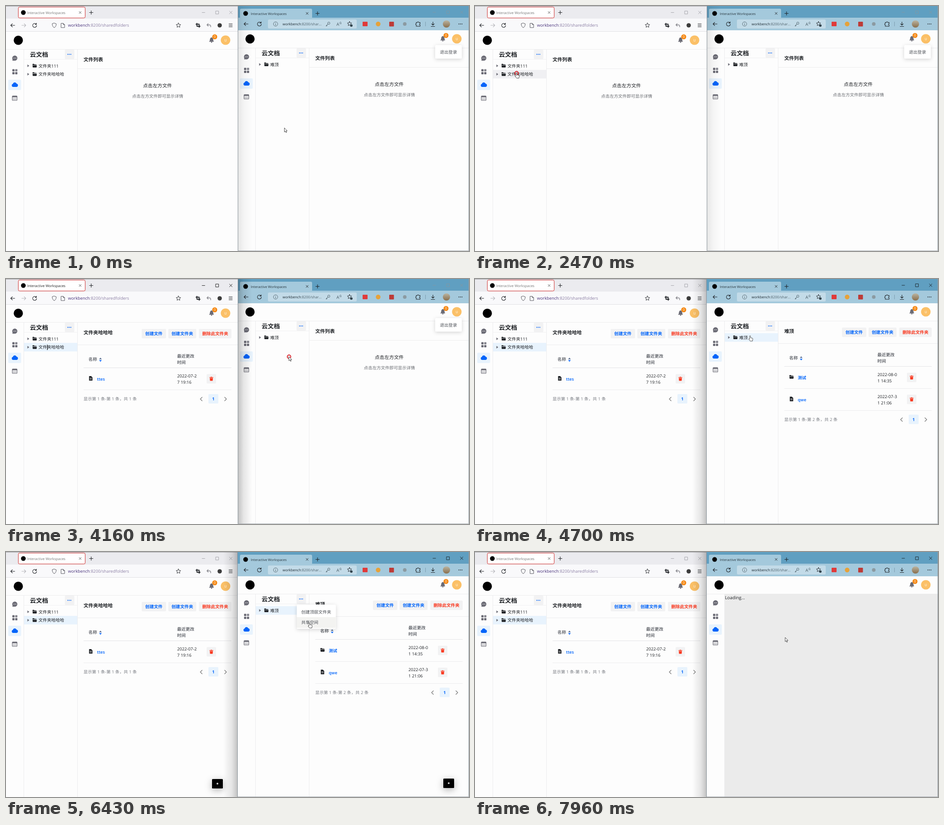
Animation, 1027 px wide and 545 px high, one loop 7990 ms. Source, as an HTML page:

```html
<!DOCTYPE html>
<html lang="zh-CN">
<head>
<meta charset="utf-8">
<title>Cloud files</title>
<style>
html, body { margin: 0; width: 100%; height: 100%; overflow: hidden; background: #fdfdfd; }
svg { display: block; width: 1027px; height: 545px; }
text { font-family: 'Open Sans', 'Noto Sans CJK SC', 'Noto Sans CJK', sans-serif; text-rendering: geometricPrecision; white-space: pre; }
</style>
</head>
<body>
<svg id="stage" viewBox="0 0 1027 545"></svg>
<script>
const LOOP = 7990;
const INK = '#1c1f23', GREY = '#6b6b75', BLUE = '#0064fa', RED = '#f93920';
const LINE = '#ececee', SOFT = '#f2f2f3', PALE = '#e8f3fd', BOLD = 'font-weight="700"', MID = 'text-anchor="middle"';

// SVG builders
const rect = (x, y, w, h, fill, r = 0, more = '') =>
  `<rect x="${x}" y="${y}" width="${w}" height="${h}" rx="${r}" fill="${fill}" ${more}/>`;
const disc = (x, y, r, fill, more = '') => `<circle cx="${x}" cy="${y}" r="${r}" fill="${fill}" ${more}/>`;
const shape = (d, fill) => `<path d="${d}" fill="${fill}"/>`;
const stroke = (d, color = INK, w = 1) =>
  `<path d="${d}" fill="none" stroke="${color}" stroke-width="${w}" stroke-linecap="round" stroke-linejoin="round"/>`;
const text = (x, y, s, size = 9.5, fill = INK, more = '') =>
  `<text x="${x}" y="${y}" font-size="${size}" fill="${fill}" ${more}>${s}</text>`;
const group = (id, body, x = 0, y = 0, more = '') =>
  `<g ${id ? `id="${id}"` : ''} transform="translate(${x} ${y})" ${more}>${body}</g>`;

// Small icons, drawn around their centre
const back = (x, y, c = INK) => stroke(`M${x + 4.5} ${y}h-9m3.7 -3.7l-3.7 3.7l3.7 3.7`, c, 1.1);
const reload = (x, y) => stroke(`M${x + 3.6} ${y - 2.4}a4.4 4.4 0 1 0 .8 2.6M${x + 4} ${y - 5}v2.9h-2.9`, INK, 1.1);
const cross = (x, y, r, c, w = 1) => stroke(`M${x - r} ${y - r}l${2 * r} ${2 * r}m0 ${-2 * r}l${-2 * r} ${2 * r}`, c, w);
const plus = (x, y) => stroke(`M${x - 4} ${y}h8m-4 -4v8`, INK, 1.1);
const dots = (x, y, gap, r, c) => [-gap, 0, gap].map(d => disc(x + d, y, r, c)).join('');
const folder = (x, y) => shape(`M${x - 4.7} ${y - 3.4}q0 -.8 .8 -.8h2.6l1.2 1.2h3.6q.8 0 .8 .8v.6h-9zM${x - 4.7} ${y - .7}h9.6l-.6 4.5h-8.4z`, INK);
const sheet = (x, y) => shape(`M${x - 3.7} ${y - 5}h4.6l2.9 2.9v7.2h-7.5z`, INK) +
  stroke(`M${x - 1.8} ${y - .4}h3.6m-3.6 2.4h3.6`, '#fff', .9);
const trash = (x, y) => rect(x - 10.5, y - 10.5, 21, 21, SOFT, 2) +
  shape(`M${x - 4.2} ${y - 3.5}h2.5l.6 -1h2.2l.6 1h2.5v1.3h-8.4zM${x - 3.5} ${y - 1.5}h7l-.6 6h-5.8z`, RED);
const star = (x, y, r) => {
  let d = '';
  for (let i = 0; i < 10; i++) {
    const a = i * Math.PI / 5, k = i % 2 ? r * .48 : r;
    d += (i ? 'L' : 'M') + (x + k * Math.sin(a)).toFixed(2) + ' ' + (y - k * Math.cos(a)).toFixed(2);
  }
  return stroke(d + 'Z', INK, .9);
};
const controls = (id, x, y) =>
  `<g id="${id}" fill="none" stroke="#aaa"><path d="M${x - 3.5} ${y}h7M${x + 27} ${y - 3.3}h6.6v6.6h-6.6zM${x + 57.4} ${y - 3.4}l6.6 6.6m0 -6.6l-6.6 6.6"/></g>`;

const leftChrome = () =>
  rect(0, 0, 514, 28, '#ebebef') + rect(0, 28, 514, 28, '#f9f9fb') + rect(0, 0, 514, 1, '#a2a2a6') +
  rect(27.5, 2.5, 148, 24, '#fff', 3, 'stroke="#f0a9a9" stroke-width="2"') +
  rect(27.5, 2.5, 148, 24, '#fff', 3, 'stroke="#cf4a4a"') +
  disc(38.5, 14.5, 5.2, '#000') +
  text(47, 17.7, 'Interactive Workspaces', 7.9, '#777', 'id="tabName"') +
  cross(164.5, 14.5, 2.3, '#444', .9) + plus(189, 14.5) + controls('leftCtl', 438, 14.5) +
  back(15, 43) + stroke('M35 43h9m-3.7 -3.7l3.7 3.7l-3.7 3.7', '#b5b5ba', 1.1) + reload(63.5, 43) +
  stroke('M107 38l4.4 1.6q.3 6 -4.4 8.6q-4.700 -2.600 -4.400 -8.600z', '#55555c') +
  stroke('M122.500 38.500h4.500l3 3v6.500h-7.500zM127 38.500v3h3', '#55555c') +
  text(137.5, 46.4, 'workbench<tspan fill="#8d80a6">:8200/sharedfolders</tspan>', 9.3, '#49337c') +
  star(382.5, 43, 5.3) +
  stroke('M423.500 38.500v6.500h7M421.500 40.500h7v7', INK, 1.8) +
  stroke('M446 42h5.500q3 .4 2.500 4.500M448.500 39.200l-2.800 2.800l2.800 2.800', '#85858c', 1.4) +
  disc(474, 43, 4.8, '#3c3c3c') +
  stroke('M494.500 39.800h7.500m-7.500 3.200h7.500m-7.500 3.200h7.500') + rect(0, 56, 514, 1, '#dedee2');

const rightChrome = () =>
  rect(514, 0, 513, 28, '#609fc1') + rect(514, 26, 513, 28, '#a4c9dc') + rect(519, 6, 160, 22, '#a4c9dc', 3) +
  disc(531.5, 16.5, 5.2, '#000') + text(543, 19.5, 'Interactive Workspaces', 7.4, '#26343c') +
  cross(668, 16.5, 2.4, INK, .9) + plus(691, 16.5) + controls('rightCtl', 950, 14) +
  back(532.5, 40) + reload(562, 40) +
  rect(581, 30, 197, 20, '#c3dbe8', 3) +
  disc(598, 40, 4.8, 'none', 'stroke="#53666f" stroke-width=".9"') + stroke('M598 39.500v3M598 37.500v.1', '#53666f') +
  text(613.5, 43, 'workbench<tspan fill="#4f626c">:8200/shar...</tspan>', 7.9, '#1c2a32') +
  disc(716, 38.3, 2.5, 'none', 'stroke="#53666f"') + stroke('M714 40l-4.300 4.300h2.300v-2', '#53666f') +
  text(733, 43.7, 'A', 9.5, '#465962') + stroke('M740 36.500q1.500 1.500 1 3.500M742 35q2 2.500 1.300 5', '#465962', .8) +
  star(762, 39.5, 5) + disc(766, 43.5, 2.8, '#33454e') +
  rect(791, 35, 11, 10, '#e03a3a', 1) + disc(825.5, 40, 5.2, '#e6a23a') + rect(850, 35, 10.5, 10.5, '#bd3b37', 1) +
  disc(884.5, 40, 4, '#8b9aa1') +
  stroke('M910 36.500h2.500q1.500 -3 3 0h3v3q-3 .8 0 2.500v3h-8.500v-3q-3 -1.500 0 -3z', INK, 1.1) +
  rect(930, 35, 1, 10, '#7c9daf') + stroke('M947 35.500v7m-3 -2.800l3 2.800l3 -2.800M943 45.500h8', INK, 1.1) +
  disc(977, 40, 8, 'url(#photo)') + dots(1008, 40, 3.4, .9, INK);

const sidebar = () =>
  disc(19.5, 116, 5.7, GREY) + shape('M14.500 117v5l5 -1z', GREY) + dots(19.5, 116, 2.7, .8, '#fff') +
  [[14, 140.5], [20.3, 140.5], [14, 147], [20.3, 147]].map(([x, y], i) => rect(x, y, 5, 5, i === 1 ? '#85858e' : GREY, 1)).join('') +
  rect(5, 164, 28.5, 23, PALE, 2) +
  shape('M16 180a3.400 3.400 0 0 1 -.6 -6.700a4.300 4.300 0 0 1 8.100 -.6a3.700 3.700 0 0 1 -.3 7.300z', BLUE) +
  rect(14, 200, 10.5, 10, 'none', 1, `stroke="${GREY}" stroke-width="1.2"`) + rect(14, 200, 10.5, 3, GREY) +
  dots(19.2, 205.3, 2.7, .8, GREY) + dots(19.2, 207.9, 2.7, .8, GREY);

const treeItem = (y, name, rowId) =>
  rect(40, y - 9.5, 118, 19, 'none', 0, rowId ? `id="${rowId}"` : '') +
  shape(`M47.500 ${y - 3}l4 3l-4 3z`, GREY) + folder(63.5, y) + text(72, y + 3.6, name);

const emptyView = id => group(id,
  text(172, 122.6, '文件列表', 10.8, INK, BOLD) + rect(159, 139, 513, 1, LINE) +
  text(336, 180.6, '点击左方文件', 10.7, INK, MID) +
  text(336.500, 204.2, '点击左方文件即可显示详情', 9.45, '#686b70', MID));

const button = (x, w, label, color) =>
  rect(x, 111, w, 21, SOFT, 2) + text(x + w / 2, 125.2, label, 9.6, color, `${BOLD} ${MID}`);

function folderView(id, title, rows, shift) {
  const n = rows.length, py = 267 + (n - 1) * 48.8;
  let left = text(172, 122.6, title, 10.8, INK, BOLD) + rect(159, 146, 513, 1, LINE) +
    text(183, 181.8, '名称', 9.5, '#696c72', 'font-weight="600"') +
    shape('M206.500 178.500l3 -3.500l3 3.500z', '#53698e') + shape('M206.500 180.500l3 3.500l3 -3.500z', BLUE) +
    rect(172, 197, 328 + shift, 1, '#e4e4e7') +
    text(172, py + 3.4, `显示第 1 条-第 ${n} 条，共 ${n} 条`, 9.4, '#777a80');
  let right = button(301, 54, '创建文件', BLUE) + button(360, 62, '创建文件夹', BLUE) + button(428, 72, '删除此文件夹', RED) +
    text(379.500, 175.4, '最近更改', 9.5, '#696c72', 'font-weight="600"') +
    text(379.500, 188.6, '时间', 9.5, '#696c72', 'font-weight="600"') +
    stroke(`M435 ${py - 4}l-4 4l4 4`, '#777', 1.3) + rect(449, py - 11, 22, 21, PALE, 2) +
    text(460, py + 3.4, '1', 9.3, BLUE, `${BOLD} ${MID}`) + stroke(`M485 ${py - 4}l4 4l-4 4`, '#777', 1.3);
  rows.forEach(([icon, name, day, time], i) => {
    const y = 222 + i * 48.8;
    left += icon(188, y - 1) + text(202, y + 4.2, name, 9.3, BLUE, 'font-weight="600"') +
      rect(172, Math.round(y + 24), 328 + shift, 1, LINE);
    right += text(379.800, y - 2.8, day, 9.3) + text(379.800, y + 10.7, time, 9.3) + trash(455.500, y);
  });
  return group(id, left + group('', right, shift), 0, 0, 'display="none"');
}

function app(x, y, shift, tree, views) {
  const top = stroke('M451.500 79h9q-1.500 -1.500 -1.500 -5.500q-.5 -3 -3 -3.300q-2.500 .3 -3 3.300q0 4 -1.500 5.500z', GREY) +
    shape('M451.500 79h9q-1.500 -1.500 -1.500 -5.500q-.5 -3 -3 -3.300q-2.500 .3 -3 3.300q0 4 -1.500 5.500z', GREY) +
    disc(456, 80.6, 1.3, GREY) + disc(463, 68.5, 5.5, '#f5860f') + text(463, 71.4, '0', 8, '#fff', MID) +
    disc(487, 76, 10.6, '#fbc067') + text(487, 78.8, 'U', 7.5, '#fff', MID);
  return group('', rect(0, 57, 514, 500, '#fdfdfd') + disc(27.3, 76.3, 10.2, '#000') + group('', top, shift) +
    rect(0, 96, 514, 1, LINE) + rect(39, 97, 1, 460, LINE) + rect(158, 97, 1, 460, LINE) + sidebar() +
    text(53, 113, '云文档', 13.5, INK, BOLD) + rect(40, 118, 118, 1, '#f1f1f2') +
    rect(130.500, 97, 21, 21, SOFT, 2, x ? 'id="moreBtn"' : '') + dots(140.5, 107.5, 3.3, 1.1, BLUE) + tree + views, x, y);
}

const menu = () => group('menu',
  rect(645, 117, 86.5, 54, '#fff', 3, 'filter="url(#soft)"') + rect(645, 144.8, 86.5, 24, 'none', 0, 'id="shareRow"') +
  text(655, 136.5, '创建顶层文件夹', 9.45, '#44484e') + text(655, 160.4, '共享空间', 9.45, '#44484e'));

const busyBox = x => rect(x, 505, 24, 21, '#000', 1.5, 'filter="url(#deep)"') +
  disc(x + 12, 515.3, 2, '#fff', 'opacity=".8"');

const fade = (id, from, to, a) =>
  `<linearGradient id="${id}" x1="${from}" x2="${to}"><stop stop-color="#000" stop-opacity="${a}"/><stop offset=".4" stop-color="#000" stop-opacity="${a * .4}"/><stop offset="1" stop-color="#000" stop-opacity="0"/></linearGradient>`;
const shadow = (id, dy, blur, a) =>
  `<filter id="${id}" x="-150%" y="-150%" width="400%" height="400%"><feDropShadow dx="0" dy="${dy}" stdDeviation="${blur}" flood-opacity="${a}"/></filter>`;

const stage = document.getElementById('stage');
stage.innerHTML =
  `<defs>${fade('toRight', 0, 1, .24)}${fade('toLeft', 1, 0, .24)}${shadow('soft', 2, 4, .16)}${shadow('deep', 4, 8, .3)}
  <linearGradient id="photo" x2="0" y2="1"><stop stop-color="#b9b4a2"/><stop offset="1" stop-color="#8a6f4c"/></linearGradient></defs>` +
  app(0, 0, 0, treeItem(133, '文件夹111') + treeItem(151.7, '文件夹哈哈哈', 'leftRow'),
    emptyView('leftEmpty') + folderView('leftFolder', '文件夹哈哈哈', [[sheet, 'ttes', '2022-07-2', '7 19:16']], 0)) +
  leftChrome() +
  app(514, -3, -1, treeItem(133, '难顶', 'rightRow'),
    emptyView('rightEmpty') + folderView('rightFolder', '难顶',
      [[folder, '测试', '2022-08-0', '1 14:35'], [sheet, 'qwe', '2022-07-3', '1 21:06']], -1)) +
  rightChrome() +
  group('loading', rect(554, 93, 473, 452, '#ebebeb') + text(554.500, 105.3, 'Loading...', 9.8)) +
  rect(514, 0, 32, 545, 'url(#toRight)', 0, 'id="shadeRight"') + rect(482, 0, 32, 545, 'url(#toLeft)', 0, 'id="shadeLeft"') +
  rect(514, 0, 1, 545, '#879199', 0, 'id="edge"') + rect(1026, 0, 1, 545, '#8f9aa1') + rect(514, 544, 513, 1, '#a5abb0') +
  group('logout', rect(952, 87, 59, 30, '#fff', 3, 'filter="url(#soft)"') + text(981.500, 106, '退出登录', 9.5, '#50545a', MID)) +
  menu() +
  group('busy', busyBox(457) + group('', busyBox(457), 513, -1)) +
  rect(91, 146, 1.2, 12, '#111', 0, 'id="caret"') +
  '<circle id="ring" r="3.8" fill="none" stroke="#d8222a" stroke-width="2"/>' +
  '<g id="pointer" fill="#fff" stroke="#222" stroke-width=".8" stroke-linejoin="round">' +
  '<path id="arrow" d="M0 0V9.300L2.200 7.300L3.600 10.700L5 10.100L3.600 6.900H6.400Z"/>' +
  '<path id="hand" d="M-1 .8A1 1 0 0 1 1.200 .8V4.200L5 5Q6.300 5.400 6.100 7L5.400 11.500H.3L-2.700 7.600Q-3 6.100 -1.600 6.500L-1 7.100Z"/></g>';

const el = {};
stage.querySelectorAll('[id]').forEach(n => el[n.id] = n);

// time, x, y of the pointer
const PATH = [
  [840, 617.5, 271], [1200, 420, 300], [1540, 305, 274], [1770, 305, 274], [2240, 92, 149],
  [2740, 92, 149], [3240, 171, 150.5], [3270, 171, 150.5], [4060, 627.5, 172.5], [4280, 627.5, 172.5],
  [4460, 600, 130], [4620, 600, 130], [4860, 638, 117], [4900, 638, 117], [5180, 660, 104],
  [5380, 660, 104], [5700, 673, 157.5], [6500, 673, 157.5], [6820, 686, 181], [6920, 686, 181], [7240, 688, 190]
];
const HANDS = [[2180, 2880], [4420, 4760], [5080, 6640]];
const CLICKS = [[2470, 2640], [4090, 4270], [4480, 4620], [6100, 6280]];
const CARET = [[2600, 3130], [3660, 4200]];

const within = (t, spans) => spans.some(([a, b]) => t >= a && t < b);
const ramp = (t, a, b) => Math.min(1, Math.max(0, (t - a) / (b - a)));
const show = (name, on) => el[name].setAttribute('display', on ? 'inline' : 'none');
const set = (name, key, value) => el[name].setAttribute(key, value);

function pointerAt(t) {
  const i = PATH.findIndex(p => p[0] > t);
  if (i === 0) return PATH[0].slice(1);
  if (i < 0) return PATH[PATH.length - 1].slice(1);
  const [a, x, y] = PATH[i - 1], [b, u, v] = PATH[i];
  const k = ramp(t, a, b), e = k * k * (3 - 2 * k);
  return [x + (u - x) * e, y + (v - y) * e];
}

function draw(t) {
  const leftOn = t >= 2520 && t < 4200, rightOn = t >= 4200;
  const [x, y] = pointerAt(t), hand = within(t, HANDS);
  set('leftCtl', 'stroke', leftOn ? '#222' : '#a5a5ab');
  set('tabName', 'fill', leftOn ? '#222' : '#777');
  set('rightCtl', 'stroke', rightOn ? '#1d2a31' : '#8098a5');
  set('shadeRight', 'opacity', leftOn ? 1 : .4);
  show('shadeRight', !rightOn);
  show('shadeLeft', rightOn);
  set('edge', 'x', rightOn ? 513 : 514);

  set('leftRow', 'fill', t >= 2580 ? PALE : t >= 2190 ? '#f0f0f3' : 'none');
  show('leftEmpty', t < 2700);
  show('leftFolder', t >= 2700);
  show('caret', within(t, CARET));

  set('rightRow', 'fill', t >= 4560 ? PALE : t >= 4410 ? '#f0f0f3' : 'none');
  show('rightEmpty', t < 4660);
  show('rightFolder', t >= 4660);
  set('moreBtn', 'fill', t >= 5080 && t < 5440 ? '#e9e9eb' : SOFT);
  show('loading', t >= 7690);
  set('logout', 'opacity', 1 - ramp(t, 4220, 4320));

  const open = ramp(t, 5190, 5300), scale = .83 + .17 * open;
  show('menu', open > 0 && t < 7690);
  set('menu', 'opacity', open);
  set('menu', 'transform', `translate(${645 * (1 - scale)} ${117 * (1 - scale)}) scale(${scale})`);
  set('shareRow', 'fill', t >= 5620 && t < 6660 ? '#f3f3f1' : 'none');

  const busy = ramp(t, 6240, 6340) - ramp(t, 7340, 7450);
  set('busy', 'opacity', busy);
  set('busy', 'transform', `translate(0 ${8 * (1 - busy)})`);

  show('ring', within(t, CLICKS));
  set('ring', 'cx', x + .3);
  set('ring', 'cy', y + .4);
  set('pointer', 'transform', `translate(${x} ${y})`);
  show('hand', hand);
  show('arrow', !hand);
}

const start = performance.now();
function tick() {
  draw((performance.now() - start) % LOOP);
  requestAnimationFrame(tick);
}
tick();
</script>
</body>
</html>
```
